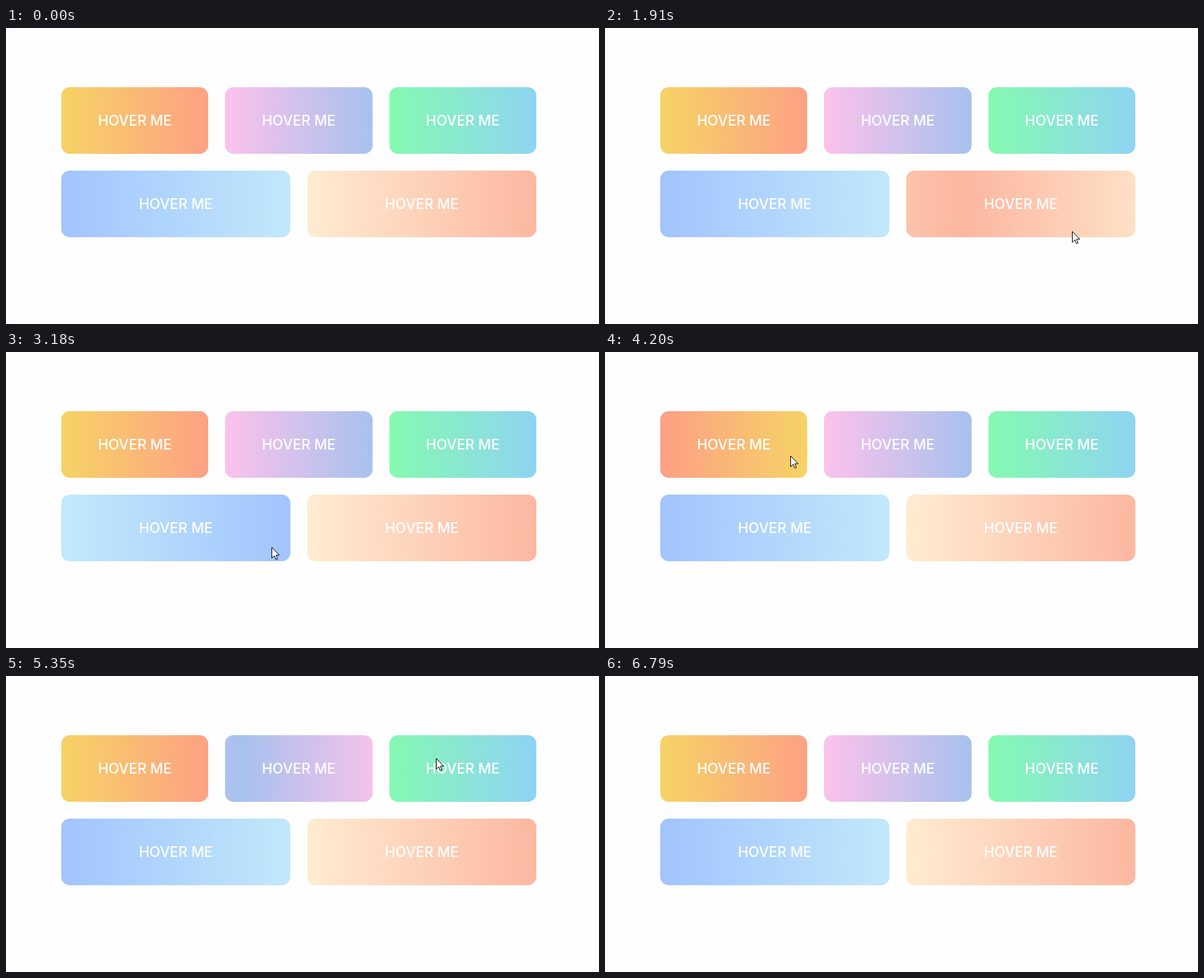
Animation of 880x440 px, one loop 7.42 s. Source, as an HTML page:

```html
<!DOCTYPE html>
<html lang="en">
<head>
<meta charset="utf-8">
<title>Gradient buttons</title>
<style>
  html, body { margin: 0; width: 100%; height: 100%; overflow: hidden; background: #fefefe; }
  .btn {
    position: absolute; height: 99px; border-radius: 12.5px;
    background-size: 200% 100%;
    font: 500 21px/100px Inter, "Open Sans", sans-serif;
    color: #fff; text-align: center; white-space: nowrap;
  }
  #cursor { position: absolute; left: 0; top: 0; width: 14px; height: 21px; }
</style>
</head>
<body>
<svg id="cursor" viewBox="0 0 14 21">
  <path d="M.5.5V16.5L4.2 13L6.6 18.6L9 17.6L6.6 12H11.6Z" fill="#fff" stroke="#000"/>
</svg>
<script>
const LOOP = 7420, FADE = 500;
const LEFT = 82, TOP = 88, WIDTH = 705, HEIGHT = 99, GAP = 25;

const rows = [
  [['#f6d365', '#fda085'], ['#fbc2eb', '#a6c1ee'], ['#84fab0', '#8fd3f4']],
  [['#a1c4fd', '#c2e9fb'], ['#ffecd2', '#fcb69f']],
];

// Pointer strokes: start, duration, end point, optional control point
const home = [700, 442];
const strokes = [
  { at: 1130, ms: 190, to: [694, 380] },
  { at: 1530, ms: 180, to: [693, 302] },
  { at: 2370, ms: 310, to: [394, 290], via: [430, 356] },
  { at: 3410, ms: 360, to: [275, 154] },
  { at: 4480, ms: 160, to: [450, 138] },
  { at: 5250, ms: 190, to: [701, 158], via: [677, 93] },
  { at: 6090, ms: 500, to: [831, 442], via: [830, 150] },
];

const clamp = v => Math.min(1, Math.max(0, v));
const smooth = k => k * k * (3 - 2 * k);

function pointerAt(t) {
  let pos = home;
  for (const { at, ms, to, via } of strokes) {
    if (t < at) break;
    const s = smooth(clamp((t - at) / ms));
    pos = pos.map((from, i) => {
      const mid = via ? via[i] : (from + to[i]) / 2;
      return from * (1 - s) ** 2 + 2 * mid * s * (1 - s) + to[i] * s * s;
    });
  }
  return pos;
}

// CSS "ease": cubic-bezier(.25, .1, .25, 1), solved by bisection
function ease(p) {
  let lo = 0, hi = 1;
  for (let i = 0; i < 20; i++) {
    const u = (lo + hi) / 2;
    if (.75 * u * (1 - u) + u ** 3 < p) lo = u; else hi = u;
  }
  return .3 * lo * (1 - lo) ** 2 + 3 * lo * lo * (1 - lo) + lo ** 3;
}

// First and last moment the pointer is over a box
function hoverSpan(x, y, w) {
  let start, end;
  for (let t = 0; t < LOOP; t += 5) {
    const [px, py] = pointerAt(t);
    if (px >= x && px < x + w && py >= y && py < y + HEIGHT) {
      start ??= t;
      end = t;
    }
  }
  return { start, end };
}

const buttons = rows.flatMap((row, r) => row.map(([outer, inner], i) => {
  const w = (WIDTH - GAP * (row.length - 1)) / row.length;
  const x = LEFT + i * (w + GAP), y = TOP + r * (HEIGHT + GAP);
  const el = document.createElement('div');
  el.className = 'btn';
  el.textContent = 'HOVER ME';
  el.style.cssText = `left:${x}px;top:${y}px;width:${w}px;` +
    `background-image:linear-gradient(to right,${outer},${inner} 51%,${outer})`;
  document.body.prepend(el);
  return { el, ...hoverSpan(x, y, w) };
}));

const cursor = document.getElementById('cursor');

function draw() {
  const t = performance.now() % LOOP;
  const fade = from => ease(clamp((t - from) / FADE));
  for (const { el, start, end } of buttons) {
    el.style.backgroundPosition = `${(fade(start) - fade(end)) * 100}% 0`;
  }
  const [x, y] = pointerAt(t).map(Math.round);
  cursor.style.transform = `translate(${x}px, ${y}px)`;
  requestAnimationFrame(draw);
}
draw();
</script>
</body>
</html>
```
